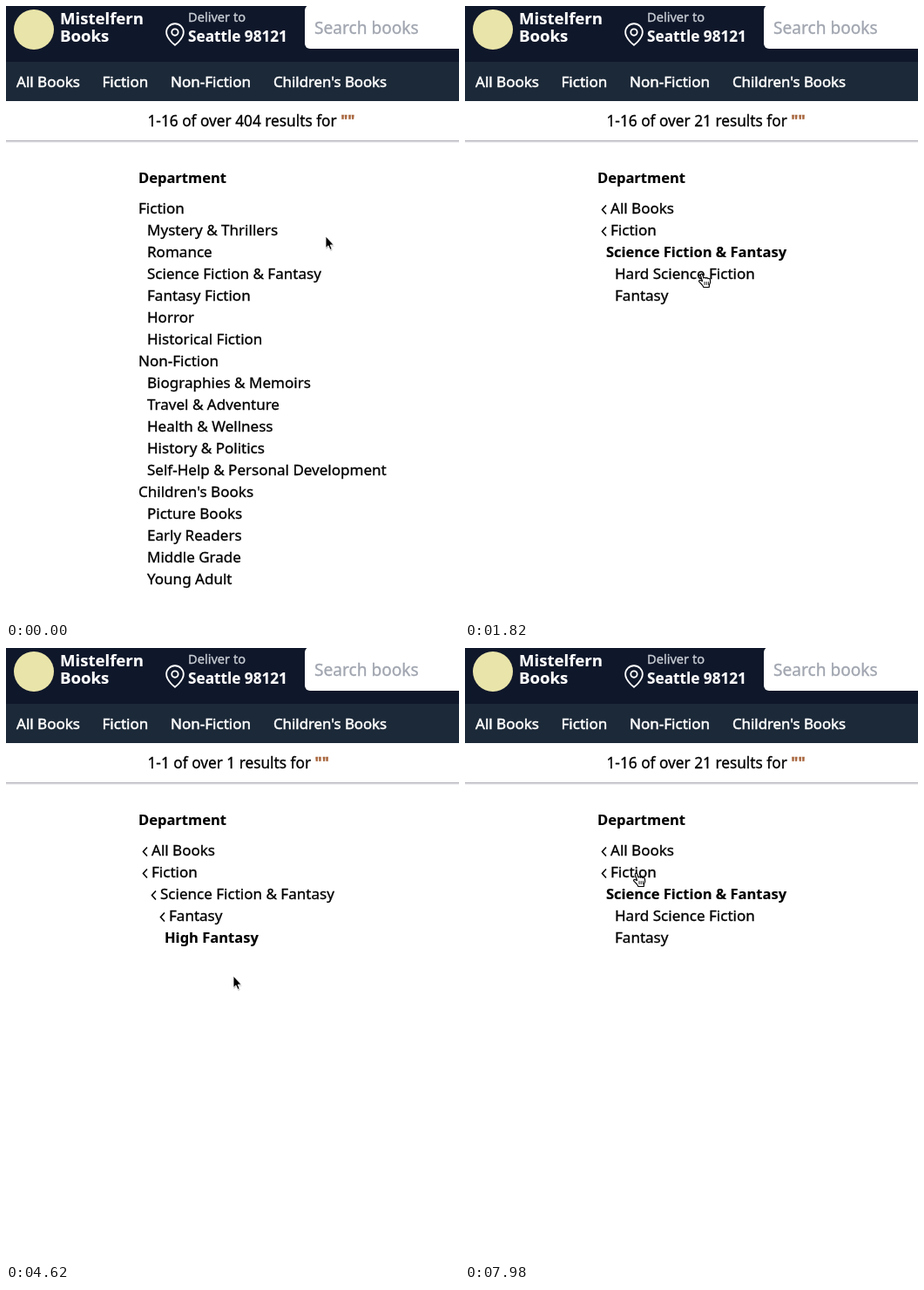
Recreate the animation shown at these times as an HTML page. Size 520 px wide and 704 px high, loop 8000 ms.

```html
<!DOCTYPE html>
<html lang="en">
<head>
<meta charset="utf-8">
<title>Bookshop departments</title>
<style>
  html, body { margin: 0; width: 100%; height: 100%; overflow: hidden; background: #fff; }
  svg { display: block; width: 520px; height: 704px; font: 17.05px "Noto Sans", "Open Sans", sans-serif; }
  text { white-space: pre; stroke: currentColor; stroke-width: .32px; fill: currentColor; }
  .bold { font-weight: 700; font-size: 16.5px; stroke-width: .15px; }
  .brand { font-size: 18.6px; }
  .light { color: #fff; }
  .menu text { stroke-width: .5px; }
  .results { font-size: 17.25px; }
  .query { font-size: 17.25px; color: #a9673f; fill: #a9673f; stroke: #a9673f; stroke-width: .5px; }
  .line { fill: none; stroke: #000; stroke-width: 1.6; }
</style>
</head>
<body>
<svg viewBox="0 0 520 704">
  <rect width="520" height="704" fill="#fff"/>
  <rect width="520" height="64" fill="#0f172a"/>
  <rect y="64" width="520" height="45" fill="#1c2938"/>
  <rect y="154" width="520" height="1.6" fill="#b5b4bd"/>
  <rect y="155.6" width="520" height="1.2" fill="#ececef"/>

  <circle cx="32" cy="27" r="23" fill="#e9e4a9"/>
  <g class="light">
    <text class="bold brand" x="62" y="20.5">Mistelfern</text>
    <text class="bold brand" x="62" y="40.5">Books</text>
    <text x="209" y="18" style="font-size:14.6px;color:#cbd0d7">Deliver to</text>
    <text class="bold" style="font-size:17.2px" x="209" y="41">Seattle 98121</text>
  </g>
  <g class="light menu">
    <text x="12" y="93">All Books</text>
    <text x="110.5" y="93">Fiction</text>
    <text x="189" y="93">Non-Fiction</text>
    <text x="307" y="93" style="font-size:16.8px">Children's Books</text>
  </g>
  <g transform="translate(179.2 17.8) scale(1.23)" fill="none" stroke="#fff" stroke-width="1.5">
    <path d="M20 10c0 6-8 12-8 12s-8-6-8-12a8 8 0 0 1 16 0Z"/>
    <circle cx="12" cy="10" r="3"/>
  </g>
  <rect x="343" y="-1" width="200" height="50" rx="6" fill="#fff"/>
  <text x="354" y="32" style="font-size:19.1px;color:#a0a5af">Search books</text>

  <text class="bold" x="152" y="203">Department</text>
  <g id="pages"></g>

  <g id="arrow">
    <path d="M0 0V13.5L3 10.8L5 15.5L7.2 14.5L5.2 10H9.3Z" fill="#000" opacity=".25" transform="translate(.5 1.5)"/>
    <path d="M0 0V13.5L3 10.8L5 15.5L7.2 14.5L5.2 10H9.3Z" stroke="#fff" stroke-width=".9"/>
  </g>
  <g id="hand" stroke="#000" stroke-linejoin="round" stroke-linecap="round">
    <path transform="translate(-6 -1)" fill="#fff" stroke-width="1.2" d="M5.5 9.5L3.4 3.2C2.8 1 5 .4 5.8 2.4L7 6C7.4 5 9 5 9.4 6.2C10 5.2 11.4 5.5 11.8 6.6C12.8 6 14.2 6.6 14.5 8C15 10 14.6 12 13.4 14L13.2 16.5H6.8C6.4 14.5 4 12.5 2 10.4C.8 8.8 2.4 7.8 3.6 8.8Z"/>
    <path d="M2 9.5V12.5M4.2 9.5V12.5M6.4 9.5V12.5" stroke-width=".9"/>
  </g>
  <g id="beam" fill="none">
    <path d="M-3.5-8Q0-8 0-5.5Q0-8 3.5-8M0-6V6M-3.5 8Q0 8 0 5.5Q0 8 3.5 8M-2 3H2" stroke="#fff" stroke-width="2.8"/>
    <path d="M-3.5-8Q0-8 0-5.5Q0-8 3.5-8M0-6V6M-3.5 8Q0 8 0 5.5Q0 8 3.5 8M-2 3H2" stroke="#000" stroke-width="1.2"/>
  </g>
</svg>
<script>
const LOOP = 8000, STEP = 70, LEFT = 152, FIRST_ROW = 232, ROW = 25;

// Leading spaces set the level; "<" marks a way back, "*" the current department.
const pages = [
  { results: "1-16 of over 404", rows: ["Fiction", " Mystery & Thrillers", " Romance",
    " Science Fiction & Fantasy", " Fantasy Fiction", " Horror", " Historical Fiction",
    "Non-Fiction", " Biographies & Memoirs", " Travel & Adventure", " Health & Wellness",
    " History & Politics", " Self-Help & Personal Development",
    "Children's Books", " Picture Books", " Early Readers", " Middle Grade", " Young Adult"] },
  { results: "1-16 of over 21", rows: ["<All Books", "<Fiction", " *Science Fiction & Fantasy",
    "  Hard Science Fiction", "  Fantasy"] },
  { results: "1-11 of over 11", rows: ["<All Books", "<Fiction", " <Science Fiction & Fantasy",
    "  *Fantasy", "   Epic Fantasy", "   Urban Fantasy", "   High Fantasy"] },
  { results: "1-1 of over 1", rows: ["<All Books", "<Fiction", " <Science Fiction & Fantasy",
    "  <Fantasy", "   *High Fantasy"] }
];

// [time, page shown from then on]
const visits = [[0, 0], [1540, 1], [2800, 2], [4340, 3], [6230, 2], [7210, 1]];

// [time, x, y] of the pointer
const stops = [[0, 367, 264], [140, 367, 264], [980, 272, 308], [1600, 272, 308],
  [1820, 273, 307], [2030, 273, 307], [2450, 215, 332], [2870, 215, 332],
  [3290, 229, 312], [3430, 229, 312], [3920, 261, 377], [4620, 261, 376],
  [4830, 261, 376], [5110, 257, 343], [5600, 234, 302], [6370, 234, 302],
  [6860, 232, 283], [7630, 232, 283], [7910, 198, 258], [LOOP, 198, 258]];

const byId = id => document.getElementById(id);
const cursors = ["arrow", "hand", "beam"].map(byId);

function add(parent, tag, attributes, content = "") {
  const node = document.createElementNS("http://www.w3.org/2000/svg", tag);
  for (const name in attributes) node.setAttribute(name, attributes[name]);
  node.textContent = content;
  return parent.appendChild(node);
}

function buildRow(group, row, index) {
  const [, indent, mark, label] = row.match(/^( *)([<*]?)(.*)$/);
  const x = LEFT + 10 * indent.length, y = FIRST_ROW + ROW * index;
  const back = mark === "<", current = mark === "*";
  if (back) add(group, "path", { class: "line", d: `M${x + 10} ${y - 3.5}l-4.5 5l4.5 5` });
  const text = add(group, "text", { x: back ? x + 15 : x, y: y + 6, class: current ? "bold" : "" }, label);
  const box = text.getBBox();
  return { left: x, right: box.x + box.width, cursor: current ? "beam" : "hand" };
}

for (const page of pages) {
  page.group = add(byId("pages"), "g", {});
  const line = add(page.group, "text", { class: "results", x: 162.5, y: 138 }, page.results + " results for ");
  add(line, "tspan", { class: "bold query" }, '""');
  page.areas = page.rows.map((row, index) => buildRow(page.group, row, index));
}

function pointerAt(time) {
  const next = stops.findIndex(stop => stop[0] > time);
  const [t0, x0, y0] = stops[next - 1], [t1, x1, y1] = stops[next];
  const u = (time - t0) / (t1 - t0), eased = u * u * (3 - 2 * u);
  return [x0 + (x1 - x0) * eased, y0 + (y1 - y0) * eased];
}

function cursorOver(page, x, y) {
  const index = Math.round((y - FIRST_ROW) / ROW), area = page.areas[index];
  const inside = area && Math.abs(y - FIRST_ROW - ROW * index) < 11 && x >= area.left && x <= area.right;
  return inside ? area.cursor : "arrow";
}

function draw(now) {
  const time = Math.floor(now % LOOP / STEP) * STEP;
  const page = pages[visits.filter(visit => visit[0] <= time).pop()[1]];
  for (const each of pages) each.group.style.display = each === page ? "" : "none";
  const [x, y] = pointerAt(time), shown = cursorOver(page, x, y);
  for (const cursor of cursors) {
    cursor.style.display = cursor.id === shown ? "" : "none";
    cursor.setAttribute("transform", `translate(${x} ${y})`);
  }
}

function tick() {
  draw(performance.now());
  requestAnimationFrame(tick);
}
tick();
</script>
</body>
</html>
```
